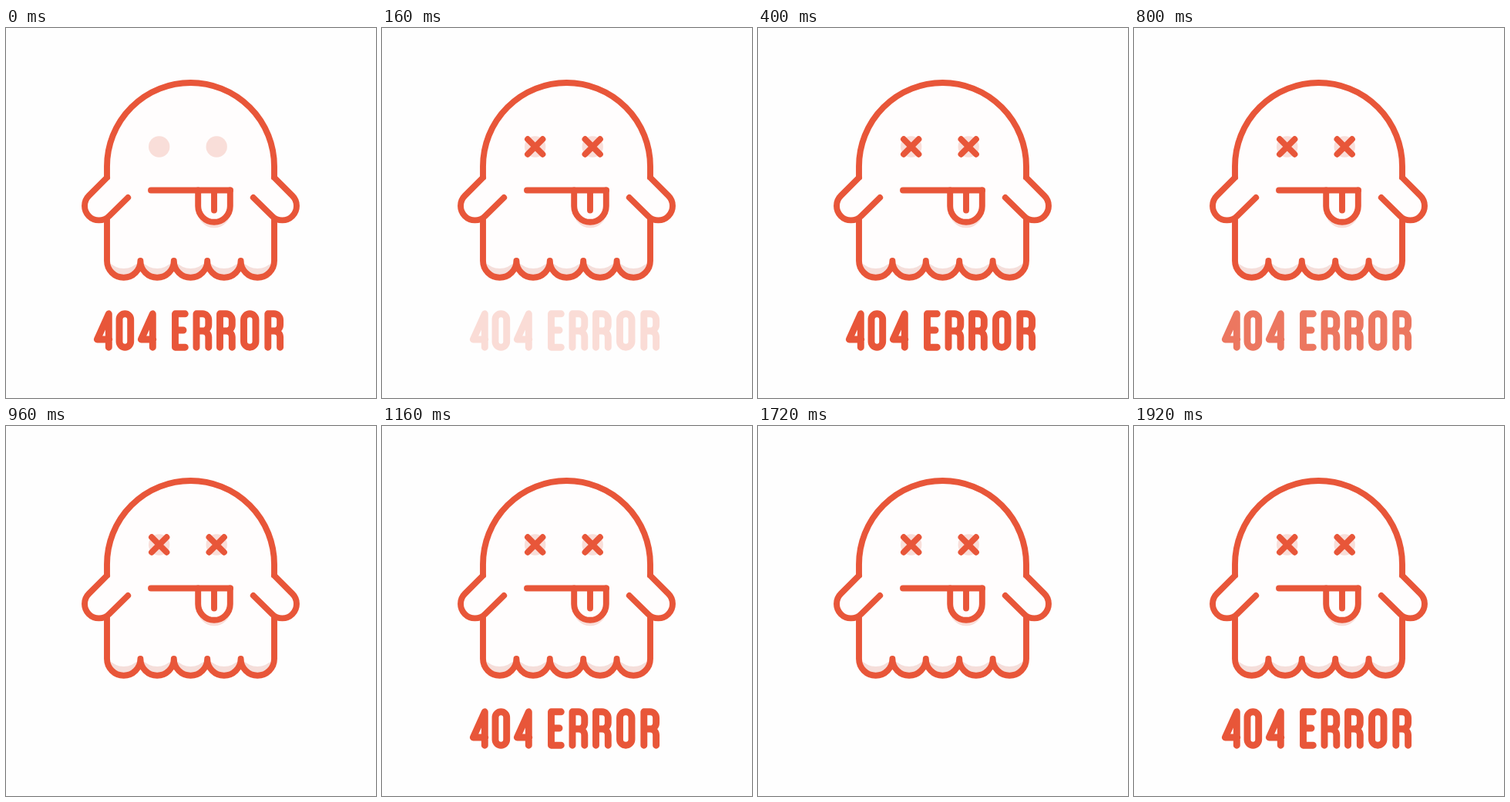
Animation, 480 px wide and 480 px high, one loop 2000 ms. Source, as an HTML page with a canvas:

```html
<!DOCTYPE html>
<html lang="en">
<head>
<meta charset="utf-8">
<title>404 error</title>
<style>
  html, body { margin: 0; width: 100%; height: 100%; overflow: hidden; background: #fefefe; }
  canvas { display: block; }
</style>
</head>
<body>
<canvas id="stage" width="480" height="480" role="img" aria-label="404 ERROR"></canvas>
<script>
const ctx = document.getElementById('stage').getContext('2d');
const LOOP = 2000, STEP = 40;
const RED = '#e85639', PINK = '#f9ded9', SHADE = '#f5deda', BODY = '#fffdfd', PAPER = '#fefefe';
const LEFT = 131, RIGHT = 348, MID = (LEFT + RIGHT) / 2;
const HEM = 302, SCALLOP = (RIGHT - LEFT) / 10;
const EYES = [198.7, 273.2], EYE_Y = 154;
const BLINKS = [200, 960, 1720], FADE = 200, POP = 160;

// Dome with a hem; each scallop is added by the callback, right to left
function silhouette(addScallop) {
  const p = new Path2D();
  const r = (RIGHT - LEFT) / 2;
  p.arc(MID, 71 + r, r, Math.PI, 0);
  p.lineTo(RIGHT, HEM);
  for (let i = 0; i < 5; i++) addScallop(p, RIGHT - SCALLOP * (2 * i + 1));
  p.closePath();
  return p;
}

const roundScallop = (p, x) => p.arc(x, HEM, SCALLOP, 0, Math.PI);
const shallowScallop = (p, x) => p.quadraticCurveTo(x, HEM + 20, x - SCALLOP, HEM);

function outline() {
  const p = new Path2D();
  const r = (RIGHT - LEFT) / 2;
  p.moveTo(LEFT, 194);
  p.arc(MID, 71 + r, r, Math.PI, 0);
  p.lineTo(RIGHT, 194);
  p.moveTo(RIGHT, 247);
  p.lineTo(RIGHT, HEM);
  for (let i = 0; i < 5; i++) roundScallop(p, RIGHT - SCALLOP * (2 * i + 1));
  p.lineTo(LEFT, 247);
  return p;
}

function leftArm() {
  const p = new Path2D();
  p.moveTo(LEFT, 194);
  p.arc(120.6, 230.8, 18.6, -Math.PI * 3 / 4, Math.PI / 4, true);
  p.lineTo(158.2, 220);
  return p;
}

function tongue() {
  const p = new Path2D();
  p.moveTo(290.8, 210.5);
  p.arc(270, 231, 20.8, 0, Math.PI);
  p.lineTo(249.2, 210.5);
  return p;
}

function mouth() {
  const p = new Path2D();
  p.moveTo(188, 210.5);
  p.lineTo(291, 210.5);
  p.moveTo(270, 212);
  p.lineTo(270, 236.5);
  return p;
}

const CAP = 370.8, BASE = 414.2;
const glyphs = {
  4(p, x) {
    p.moveTo(x + 15, BASE);
    p.lineTo(x + 15, CAP);
    p.lineTo(x, 404);
    p.lineTo(x + 15.5, 404);
  },
  O(p, x, w) {
    p.roundRect(x, CAP, w, BASE - CAP, w / 2);
  },
  E(p, x) {
    p.moveTo(x + 12.8, CAP);
    p.lineTo(x, CAP);
    p.lineTo(x, BASE);
    p.lineTo(x + 12.8, BASE);
    p.moveTo(x, 392);
    p.lineTo(x + 10.5, 392);
  },
  R(p, x) {
    p.moveTo(x, BASE);
    p.lineTo(x, CAP);
    p.lineTo(x + 8, CAP);
    p.arc(x + 8, CAP + 7.8, 7.8, -Math.PI / 2, 0);
    p.arc(x + 8, 385.2, 7.8, 0, Math.PI / 2);
    p.lineTo(x, 393);
    p.moveTo(x + 8, 393);
    p.arc(x + 8, 400.8, 7.8, -Math.PI / 2, 0);
    p.lineTo(x + 15.8, BASE);
  }
};

function lettering() {
  const p = new Path2D();
  const letters = [['4', 118.3], ['O', 147, 14.7], ['4', 175.3],
    ['E', 219.5], ['R', 247], ['R', 277.5], ['O', 308.5, 15.5], ['R', 339.8]];
  for (const [name, x, w] of letters) glyphs[name](p, x, w);
  return p;
}

const shape = {
  body: silhouette(shallowScallop), shade: silhouette(roundScallop), outline: outline(),
  arm: leftArm(), tongue: tongue(), mouth: mouth(), text: lettering()
};

function fill(path, color) {
  ctx.fillStyle = color;
  ctx.fill(path);
}

function stroke(path, width = 7.9) {
  ctx.strokeStyle = RED;
  ctx.lineWidth = width;
  ctx.stroke(path);
}

function disc(x, y, r, color) {
  ctx.fillStyle = color;
  ctx.beginPath();
  ctx.arc(x, y, r, 0, Math.PI * 2);
  ctx.fill();
}

function drawArms() {
  for (const side of [1, -1]) {
    ctx.save();
    ctx.translate(MID, 0);
    ctx.scale(side, 1);
    ctx.translate(-MID, 0);
    fill(shape.arm, BODY);
    stroke(shape.arm);
    ctx.restore();
  }
}

function backOut(p) {
  const q = p - 1;
  return 1 + 2.7 * q ** 3 + 1.7 * q ** 2;
}

function drawEye(x, scale) {
  disc(x, EYE_Y, 13.7, PINK);
  if (scale <= 0.001) return;
  const cross = new Path2D('M-9.7-9.7 9.7 9.7M9.7-9.7-9.7 9.7');
  ctx.save();
  ctx.translate(x, EYE_Y);
  ctx.scale(scale, scale);
  stroke(cross);
  ctx.restore();
}

function draw(t) {
  ctx.fillStyle = PAPER;
  ctx.fillRect(0, 0, 480, 480);
  ctx.lineCap = ctx.lineJoin = 'round';

  fill(shape.shade, SHADE);
  fill(shape.body, BODY);
  stroke(shape.outline);
  drawArms();

  disc(270, 238, 21.3, PINK);
  fill(shape.tongue, BODY);
  stroke(shape.tongue);
  stroke(shape.mouth);

  const pop = backOut(Math.min(1, t / POP));
  for (const x of EYES) drawEye(x, pop);

  ctx.globalAlpha = Math.min(1, ...BLINKS.map(mid => Math.abs(t - mid) / FADE));
  stroke(shape.text, 8.9);
  ctx.globalAlpha = 1;
}

let start;
function tick(now) {
  start ??= now;
  draw(Math.floor((now - start) % LOOP / STEP) * STEP);
  requestAnimationFrame(tick);
}
draw(0);
requestAnimationFrame(tick);
</script>
</body>
</html>
```
